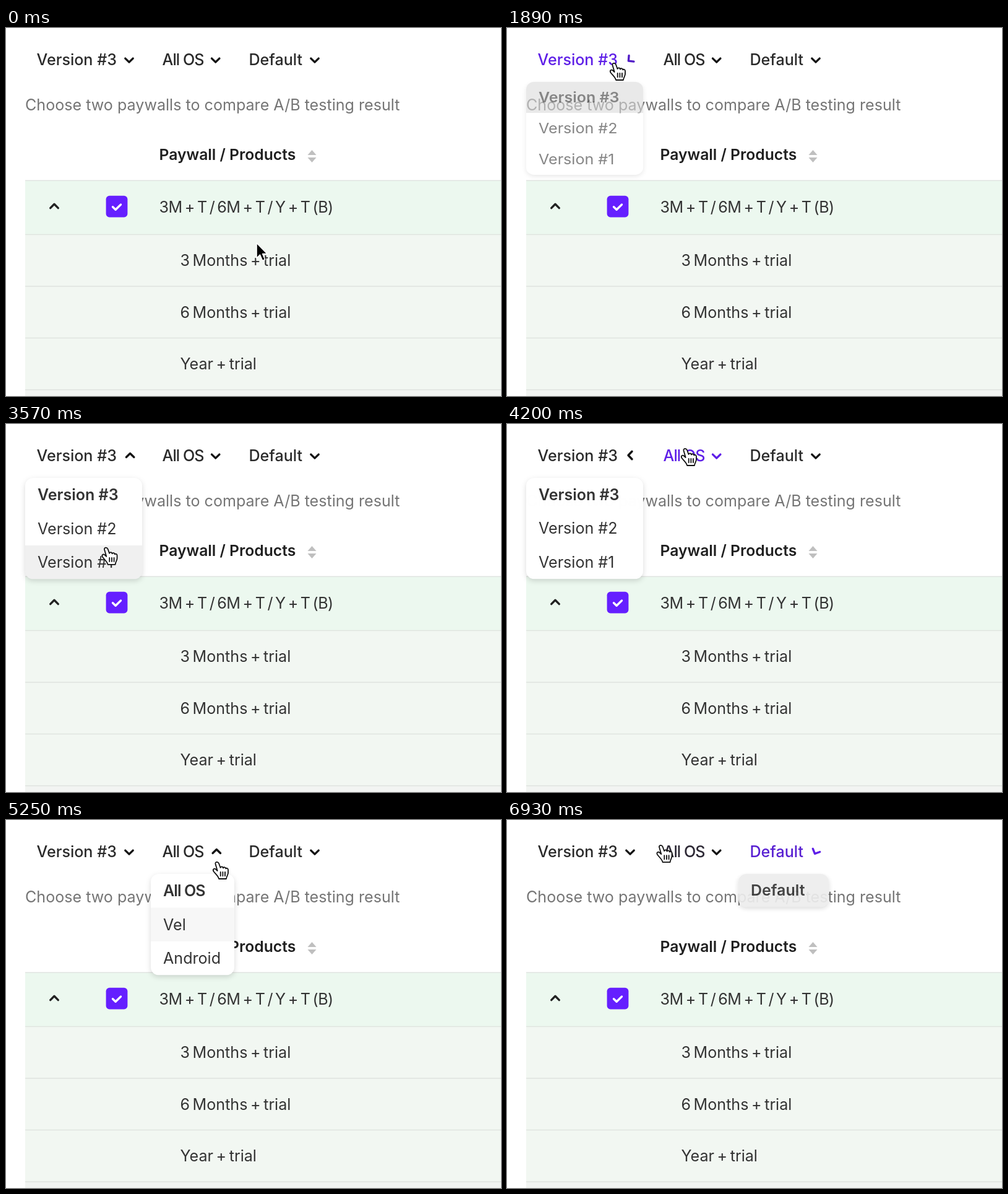
Recreate the animation shown at these times as an HTML page. Size 800 by 594 pixels, loop 7000 ms.

```html
<!DOCTYPE html>
<html lang="en">
<head>
<meta charset="utf-8">
<title>Paywall filters</title>
<style>
html, body { margin: 0; width: 100%; height: 100%; overflow: hidden; background: #fff; }
svg { display: block; width: 100vw; height: 100vh; }
text { font: 400 25.1px Inter, "Open Sans", sans-serif; fill: #333; white-space: pre; }
.title { font-weight: 500; }
.head { font-weight: 600; font-size: 24.7px; fill: #1f1f1f; }
.hint { fill: #757575; }
.row { word-spacing: -2.5px; }
.dense { letter-spacing: -.5px; }
.chosen { font-weight: 600; font-size: 25px; }
.tight { letter-spacing: -.9px; }
.panel { filter: drop-shadow(0 3px 4px rgba(0, 0, 0, .15)); }
.line { fill: none; stroke-width: 3.4; stroke-linecap: round; stroke-linejoin: round; }
</style>
</head>
<body>
<svg id="stage" viewBox="0 0 800 594"></svg>
<script>
const LOOP = 7000, STEP = 70;
const PANEL_Y = 87, ITEM_H = 54.5, ROW_H = 83.5;
const BLACK = [20, 20, 20], INK = [42, 42, 42], VIOLET = [94, 31, 232];
const stage = document.getElementById("stage");

function add(parent, tag, attrs, content) {
  const node = document.createElementNS("http://www.w3.org/2000/svg", tag);
  for (const key in attrs) node.setAttribute(key, attrs[key]);
  if (content) node.textContent = content;
  parent.appendChild(node);
  return node;
}
const rect = (parent, x, y, width, height, fill, rx = 0) =>
  add(parent, "rect", { x, y, width, height, fill, rx });
const label = (parent, x, y, content, cls) =>
  add(parent, "text", { x, y, class: cls }, content);

const clamp = v => Math.max(0, Math.min(1, v));
const smooth = v => v * v * (3 - 2 * v);
const ramp = (t, start, length) => clamp((t - start) / length);
const lerp = (a, b, k) => a + (b - a) * k;
const mix = (a, b, k) => `rgb(${a.map((v, i) => Math.round(lerp(v, b[i], k)))})`;

// Pointer stops: arrival, departure, x, y.
const stops = [
  [0, 420, 405, 347], [910, 1120, 330, 255], [1700, 2800, 174, 57],
  [3190, 3450, 145, 222], [4000, 4300, 289, 40], [4700, 5120, 300, 165],
  [5250, 5250, 342, 68], [5600, 5900, 460, 53], [6300, 6820, 472, 51],
  [LOOP, LOOP, 137, 36]
];

function pointerAt(t) {
  const i = stops.findIndex(stop => stop[0] > t);
  const [, leave, x0, y0] = stops[i - 1], [arrive, , x1, y1] = stops[i];
  const k = smooth(ramp(t, leave, arrive - leave));
  return [lerp(x0, x1, k), lerp(y0, y1, k)];
}

// Share of the last `span` ms in which the pointer passed the test.
function recent(t, span, test) {
  let hits = 0;
  for (let age = 0; age < span; age += 10) hits += test(...pointerAt(Math.max(0, t - age)));
  return hits * 10 / span;
}

function firstTime(from, until, test) {
  for (let t = from; t < until; t += 10) if (test(...pointerAt(t))) return t;
  return Infinity;
}

// Each click closes one menu and opens the next.
const clicks = [1710, 4100, 5680, 6776];
const menus = [
  { x: 31, w: 189, chevronX: 199, cls: "", items: ["Version #3", "Version #2", "Version #1"] },
  { x: 234, w: 135, chevronX: 338.7, cls: "tight", items: ["All OS", "Vel", "Android"] },
  { x: 374, w: 146, chevronX: 499, cls: "", items: ["Default"] }
];

menus.forEach((menu, i) => {
  const inside = x => x > menu.x && x < menu.x + menu.w;
  const bottom = PANEL_Y + menu.items.length * ITEM_H;
  menu.open = clicks[i] + 110;
  menu.close = clicks[i + 1];
  menu.onTitle = (x, y) => x > menu.x + 15 && x < menu.chevronX + 10 && y > 36 && y < 66;
  menu.onItem = n => (x, y) => inside(x) && Math.floor((y - PANEL_Y) / ITEM_H) === n;
  menu.moved = firstTime(menu.open, menu.close,
    (x, y) => inside(x) && y > PANEL_Y + ITEM_H && y < bottom);
});
const handFrom = firstTime(0, LOOP, menus[0].onTitle);

function drawTable() {
  label(stage, 31, 133, "Choose two paywalls to compare A/B testing result", "hint");
  label(stage, 247.5, 213, "Paywall / Products", "head");
  add(stage, "path", { d: "M487.5 205h14l-7-8zM487.5 209h14l-7 8z", fill: "#bfbfbf" });

  rect(stage, 31, 246, 769, 88, "#ecf8ef");
  rect(stage, 31, 334, 769, 250, "#f2f7f2");
  rect(stage, 31, 584, 769, 10, "#f2f4f2");
  rect(stage, 31, 245.5, 769, 1.4, "#dfe3df");
  for (let i = 0; i < 4; i++) rect(stage, 31, 332.7 + i * ROW_H, 769, 1.4, "#dfe3df");

  add(stage, "path", { d: "M71.7 290.6l6.3-6.3 6.3 6.3", class: "line", stroke: "#222" });
  rect(stage, 161.6, 270.8, 34.8, 34.6, "#651fff", 5.5);
  add(stage, "path", { d: "M172.5 288.7l4.6 4.5 8.4-8.2", class: "line", stroke: "#fff" });

  label(stage, 247.5, 298, "3M + T / 6M + T / Y + T (B)", "row dense");
  ["3 Months + trial", "6 Months + trial", "Year + trial"].forEach((name, i) =>
    label(stage, 281.5, 384 + i * ROW_H, name, "row"));
}

function buildTitle(menu) {
  menu.title = label(stage, menu.x + 18.5, 60, menu.items[0], "title " + menu.cls);
  menu.chevron = add(stage, "path", { d: "M-7-2.2l6.2 6 6.2-6", class: "line" });
}

function buildPanel(menu, index) {
  const height = menu.items.length * ITEM_H;
  const clip = add(stage, "clipPath", { id: "panel" + index });
  rect(clip, menu.x, 0, menu.w, height, "#000", 13);
  menu.panel = add(stage, "g", { class: "panel" });
  const body = add(menu.panel, "g", { "clip-path": `url(#panel${index})` });
  rect(body, menu.x, 0, menu.w, height, "#fff");
  menu.shades = menu.items.map((name, i) => {
    const shade = rect(body, menu.x, i * ITEM_H, menu.w, ITEM_H, "#000");
    label(body, menu.x + 20, 36 + i * ITEM_H, name, i ? "" : "chosen " + menu.cls);
    return shade;
  });
}

function drawMenu(menu, t) {
  const { open, close, title, chevron, panel } = menu;
  const turn = smooth(ramp(t, open, 200)) - smooth(ramp(t, close, 200));
  const glow = time => smooth(recent(time, 280, menu.onTitle));
  title.style.fill = mix(INK, VIOLET, glow(t));
  chevron.setAttribute("stroke", mix(BLACK, VIOLET, glow(t - 60)));
  chevron.setAttribute("transform", `translate(${menu.chevronX + .8} 51.3) rotate(${180 * turn})`);

  const shown = 1 - (1 - ramp(t, open + 30, 200)) ** 4 - ramp(t, close + 30, 200) ** 5;
  panel.setAttribute("display", shown > .001 ? "inline" : "none");
  panel.setAttribute("opacity", shown);
  panel.setAttribute("transform", `translate(0 ${PANEL_Y}) scale(1 ${.8 + .2 * shown})`);

  // The chosen item stays dark until another item is hovered or the panel closes.
  const dark = (1 - ramp(t, menu.moved, 200)) * (1 - ramp(t, close, 300));
  menu.shades.forEach((shade, i) =>
    shade.setAttribute("opacity", i ? .06 * recent(t, 200, menu.onItem(i)) : .145 * dark));
}

drawTable();
menus.forEach(buildTitle);
menus.forEach(buildPanel);

const arrow = add(stage, "path", {
  d: "M0 0V24.5L5.5 19.2 9.5 28.5 13.6 26.7 9.7 17.6H17.3Z",
  fill: "#000", stroke: "#fff", "stroke-width": 1.6, "stroke-linejoin": "round"
});
const hand = add(stage, "g", {
  stroke: "#111", "stroke-width": 1.8, "stroke-linejoin": "round", "stroke-linecap": "round"
});
add(hand, "path", {
  d: "M-3.5 3C-4.5-.5 .5-1.5 2 2L4.5 9C5.5 6.5 8.5 7 9 9.5 10 7.5 13 8 13.2 10.5 14.5 9 17 10 17 12.5V17C17 21 14.5 22 14 27H2C1.5 23-3.5 19-6.5 15-8.5 11.5-5.5 9.5-3 11.5L-.3 14Z",
  fill: "#fff"
});
add(hand, "path", { d: "M4.7 16v6.3M8.4 16v6.3M12 16v6.3", fill: "none" });

function draw(t) {
  menus.forEach(menu => drawMenu(menu, t));
  const [x, y] = pointerAt(t), pointing = t >= handFrom;
  arrow.setAttribute("display", pointing ? "none" : "inline");
  hand.setAttribute("display", pointing ? "inline" : "none");
  (pointing ? hand : arrow).setAttribute("transform", `translate(${x} ${y})`);
}

const begin = performance.now();
function tick() {
  const t = (performance.now() - begin) % LOOP;
  draw(Math.floor(t / STEP) * STEP);
  requestAnimationFrame(tick);
}
tick();
</script>
</body>
</html>
```
